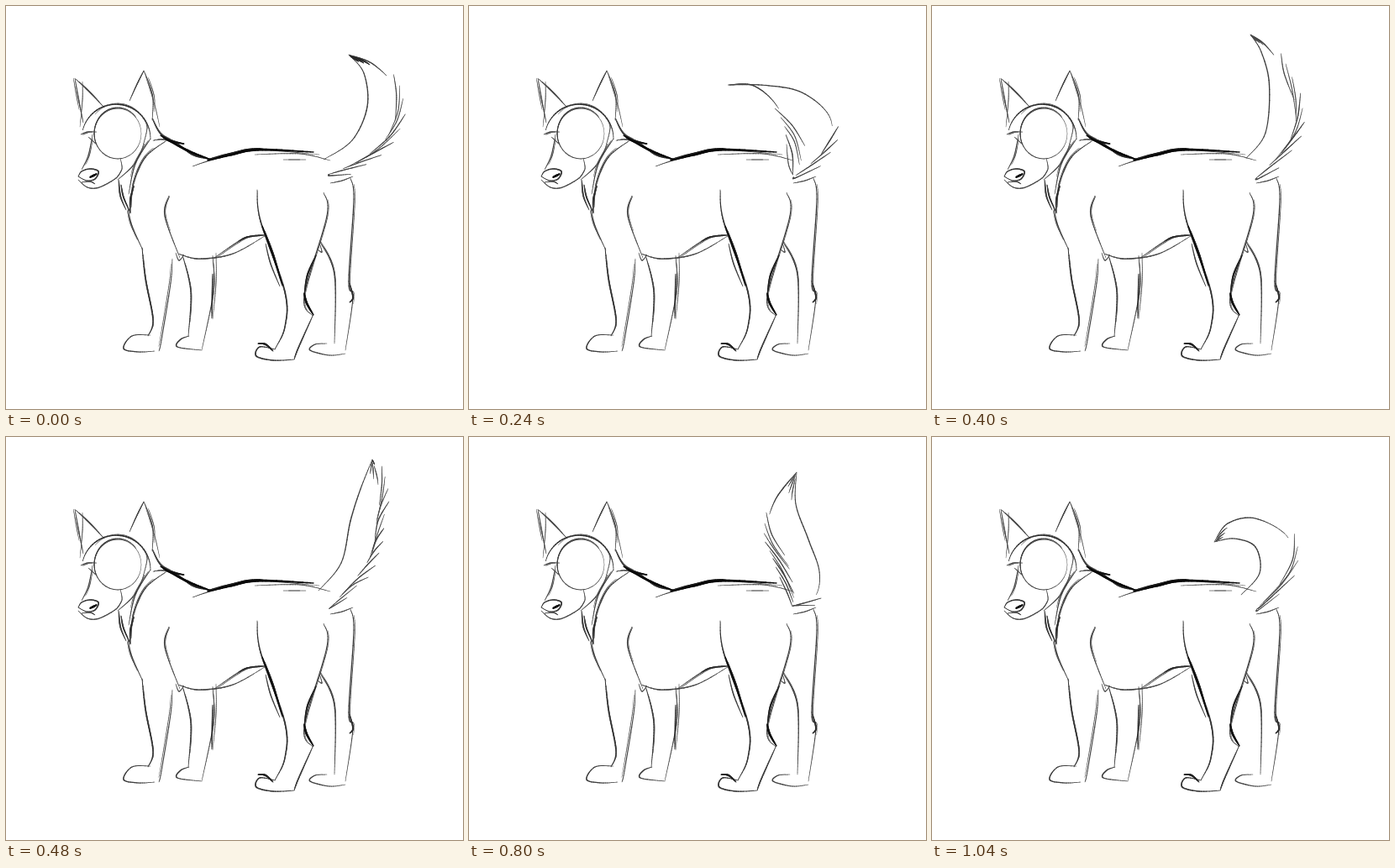
Recreate the animation shown at these times as an HTML page with a canvas. Size 544 by 480 pixels, loop 1120 ms.

```html
<!DOCTYPE html>
<html lang="en">
<head>
<meta charset="utf-8">
<title>Dog wagging its tail</title>
<style>
html, body { margin: 0; width: 100%; height: 100%; overflow: hidden; background: #fff; }
canvas { display: block; }
</style>
</head>
<body>
<canvas id="stage" width="544" height="480"></canvas>
<script>
const ctx = document.getElementById('stage').getContext('2d');
const HOLD = 80, COUNT = 14;

let seed = 1;
function rand() {
  seed = seed * 16807 % 2147483647;
  return seed / 2147483647;
}

const lerp = (a, b, t) => a + (b - a) * t;
const mix = (p, q, t) => p.map((v, i) => lerp(v, q[i], t));

function pairs(list) {
  const pts = [];
  for (let i = 0; i < list.length; i += 2) pts.push([list[i], list[i + 1]]);
  return pts;
}

const spline = (a, b, c, d, t) =>
  b + .5 * t * (c - a + t * (2 * a - 5 * b + 4 * c - d + t * (3 * (b - c) + d - a)));

// Smooth curve through the points, as a function of u from 0 to 1.
function curve(pts) {
  const last = pts.length - 1;
  const at = i => pts[Math.max(0, Math.min(last, i))];
  return u => {
    const s = Math.max(0, Math.min(1, u)) * last, i = Math.min(last - 1, Math.floor(s));
    return [0, 1].map(n => spline(at(i - 1)[n], at(i)[n], at(i + 1)[n], at(i + 2)[n], s - i));
  };
}

// Brush line along a curve, thinner at both ends.
function stroke(width, fn, from = 0, to = 1) {
  const steps = 36, grey = Math.max(8, Math.round(112 - 40 * width));
  ctx.strokeStyle = `rgb(${grey},${grey},${grey})`;
  let prev = fn(from);
  for (let k = 1; k <= steps; k++) {
    const next = fn(lerp(from, to, k / steps));
    ctx.lineWidth = width * (.45 + .6 * Math.sin(Math.PI * k / steps));
    ctx.beginPath();
    ctx.moveTo(...prev);
    ctx.lineTo(...next);
    ctx.stroke();
    prev = next;
  }
}

const line = (width, ...xy) => stroke(width, curve(pairs(xy)));

// A line with a fainter, shorter second pass beside it.
function rough(width, ...xy) {
  const fn = curve(pairs(xy));
  const dx = rand() * 4 - 2, dy = rand() * 3 - 1.5, from = rand() * .2;
  stroke(width, fn);
  stroke(width * .7, u => [fn(u)[0] + dx, fn(u)[1] + dy], from, from + .65);
}

function arc(width, cx, cy, rx, ry, a, b) {
  stroke(width, t => [cx + rx * Math.cos(t), cy + ry * Math.sin(t)], a, b);
}

function head() {
  rough(1.2, 82,86, 87,114, 92,139);
  rough(1.2, 83,87, 100,103, 117,121);
  line(.9, 91,90, 91,112, 88,144);
  rough(1.2, 164,77, 156,93, 147,113);
  rough(1.2, 164,77, 170,92, 175,111, 174,136);
  line(.8, 166,83, 177,118, 183,144);
  arc(1.6, 131, 158, 41, 41, 3.4, 6.3);
  arc(.8, 133, 157, 37, 41, 3.9, 6);
  arc(1, 133, 152, 28, 30, 0, 6.28);
  arc(1.3, 133, 152, 28, 31, 2.7, 5.6);
  line(.9, 162,132, 168,145, 160,177);
  rough(1, 89,153, 97,150, 108,150);
  rough(1.1, 103,153, 98,178, 90,195);
  line(.8, 98,156, 108,165);
  line(1.5, 86,203, 90,197, 100,194, 110,197, 106,206, 96,208, 86,203);
  line(2.3, 100,204, 108,200);
  line(1.2, 86,207, 97,216, 111,216, 131,205, 137,196);
  line(1.1, 90,210, 100,209, 106,212);
  line(.9, 136,181, 138,194, 132,204);
  line(1.1, 165,164, 152,189, 133,207);
}

function neck() {
  rough(1.4, 174,134, 186,154, 212,165);
  rough(2.4, 184,154, 196,161, 212,164);
  rough(1, 176,160, 188,159, 204,165);
  rough(1.3, 190,161, 166,180, 152,211, 149,240);
  rough(1.2, 172,158, 154,188, 146,224);
  rough(1.4, 134,207, 136,226, 143,243);
  rough(1.7, 152,214, 148,230, 148,247);
  line(1.6, 137,213, 140,228, 148,246);
  rough(1.2, 145,241, 150,262, 163,291);
}

function trunk() {
  line(2.8, 188,157, 220,174, 244,183);
  line(1.7, 202,162, 222,177, 241,182);
  line(1.2, 222,191, 250,182, 300,172, 373,177);
  rough(3, 240,184, 268,177, 300,171, 366,174);
  line(1, 296,177, 350,176, 386,184);
  line(.8, 330,183, 357,183);
  rough(1.2, 205,295, 230,301, 270,295, 308,274);
  rough(1.1, 248,300, 283,277, 308,272);
  line(1.7, 277,280, 288,275, 308,273);
}

function foreLegs() {
  rough(1.2, 194,226, 189,250, 207,300);
  rough(1.6, 162,288, 166,325, 175,374, 169,393);
  line(1.3, 172,392, 150,393, 140,408, 158,412, 177,411);
  rough(1.1, 198,301, 196,330, 185,398, 182,411);
  line(.9, 202,294, 206,303, 212,296);
  rough(1.4, 210,296, 220,340, 217,393);
  line(1.3, 218,393, 208,397, 204,406, 233,410);
  rough(1.1, 246,297, 247,340, 233,410);
  line(.9, 250,294, 250,330, 246,373);
  line(1.6, 246,319, 245,372);
}

function hindLegs() {
  rough(1.6, 299,219, 303,256, 332,340, 332,382, 320,409);
  rough(2.4, 305,262, 318,297, 329,333);
  line(1.3, 309,283, 315,307, 326,334);
  rough(2, 300,402, 309,403, 318,411);
  line(1.5, 320,409, 302,406, 298,417, 318,422, 343,421);
  rough(1.2, 378,222, 382,250, 355,345, 365,369);
  line(2, 369,297, 359,320, 355,344);
  line(2.4, 355,342, 358,354, 366,368);
  rough(1.4, 366,367, 348,407, 343,421);
  rough(1.3, 374,281, 391,320, 391,402);
  line(.9, 373,282, 376,293, 371,290);
  line(1.2, 382,402, 368,403, 362,410, 385,416, 404,414);
  rough(1.3, 410,205, 414,230, 408,328, 413,347, 404,410);
  line(1.7, 409,330, 413,347, 409,353);
}

// Ten points: inner edge from the root, tip, outer edge to the root.
// inner and outer tell how much of each edge, from the tip, is a clean line.
const pose = (inner, outer, tip, ...xy) => ({ inner, outer, tip, pts: pairs(xy) });

const curlRight = pose(1, .3, 1.8, 378,183, 412,160, 430,120, 426,80, 408,58,
  438,70, 464,100, 464,145, 430,182, 386,203);
const upLeft = pose(.1, .75, 1, 378,186, 366,150, 353,114, 348,80, 347,55,
  396,94, 422,128, 426,165, 412,190, 386,206);
const curlLeft = pose(1, .55, 1, 376,180, 395,152, 393,114, 362,101, 322,121,
  345,87, 390,75, 434,102, 439,155, 390,207);
const straight = pose(1, .05, 1, 372,183, 399,150, 410,100, 422,62, 436,27,
  449,60, 444,100, 438,140, 415,175, 386,207);
const right = pose(1, .2, 1, 372,188, 398,155, 402,110, 432,71, 495,93,
  465,92, 452,122, 438,155, 418,185, 382,205);
const thinUp = pose(.35, .78, 1, 376,183, 366,150, 354,116, 364,76, 390,42,
  389,80, 404,122, 417,160, 412,190, 386,204);
const hook = pose(1, .6, 1, 368,188, 390,162, 385,131, 360,121, 336,125,
  352,103, 385,97, 424,120, 427,160, 389,207);

// A drawing between two poses, its tip swung by dx, dy.
function between(a, b, t, dx, dy) {
  const pts = a.pts.map((p, i) => {
    const pull = Math.max(0, 1 - Math.abs(i - 4) / 3);
    const [x, y] = mix(p, b.pts[i], t);
    return [x + dx * pull, y + dy * pull];
  });
  const part = key => lerp(a[key], b[key], t);
  return { inner: part('inner'), outer: part('outer'), tip: 1, pts };
}

const wag = [
  curlRight, between(curlRight, upLeft, .5, 0, -8),
  upLeft, between(upLeft, curlLeft, .5, -26, 6),
  curlLeft, between(curlLeft, straight, .5, 0, -40),
  straight, between(straight, right, .5, 5, -18),
  right, between(right, thinUp, .5, 12, -36),
  thinUp, between(thinUp, hook, 1 / 3, -50, -7), between(thinUp, hook, 2 / 3, -76, 25),
  hook
];

// Hairs that stand off one edge and run back towards the root.
function fur(edge, other, from, out, depth) {
  for (let u = from; u < .9; u += .075) {
    const len = .16 + rand() * .12, push = out * (.5 + rand());
    const shift = (v, d) => {
      const p = edge(v), q = other(v), size = Math.hypot(p[0] - q[0], p[1] - q[1]) || 1;
      return mix(p, q, -d / size);
    };
    const hair = [shift(u, push), shift(u + len / 2, -depth * .35), shift(u + len, -depth)];
    stroke(.95 + rand() * .35, curve(hair));
  }
}

function tail({ pts, inner, outer, tip }) {
  const left = curve(pts.slice(0, 5).reverse()), edge = curve(pts.slice(4));
  stroke(1.3, left, 0, inner);
  stroke(1.25, edge, 0, outer);
  if (inner < .95) fur(left, edge, inner, 3, 20);
  fur(edge, left, outer, 6, 3);
  for (let k = 1; k < 4; k++) {
    stroke(tip, u => mix(left(u), edge(u), k / 4), .02 * k, .1 + .03 * k);
  }
  line(1, 386,211, 400,208, 413,203);
}

function draw(step) {
  seed = 77;
  ctx.globalCompositeOperation = 'source-over';
  ctx.fillStyle = '#fff';
  ctx.fillRect(0, 0, 544, 480);
  ctx.globalCompositeOperation = 'darken';
  ctx.lineCap = 'round';
  [head, neck, trunk, foreLegs, hindLegs].forEach(part => part());
  tail(wag[step]);
}

let shown = -1;
const start = performance.now();
function tick() {
  const step = Math.floor((performance.now() - start) / HOLD) % COUNT;
  if (step !== shown) draw(shown = step);
  requestAnimationFrame(tick);
}
tick();
</script>
</body>
</html>
```
